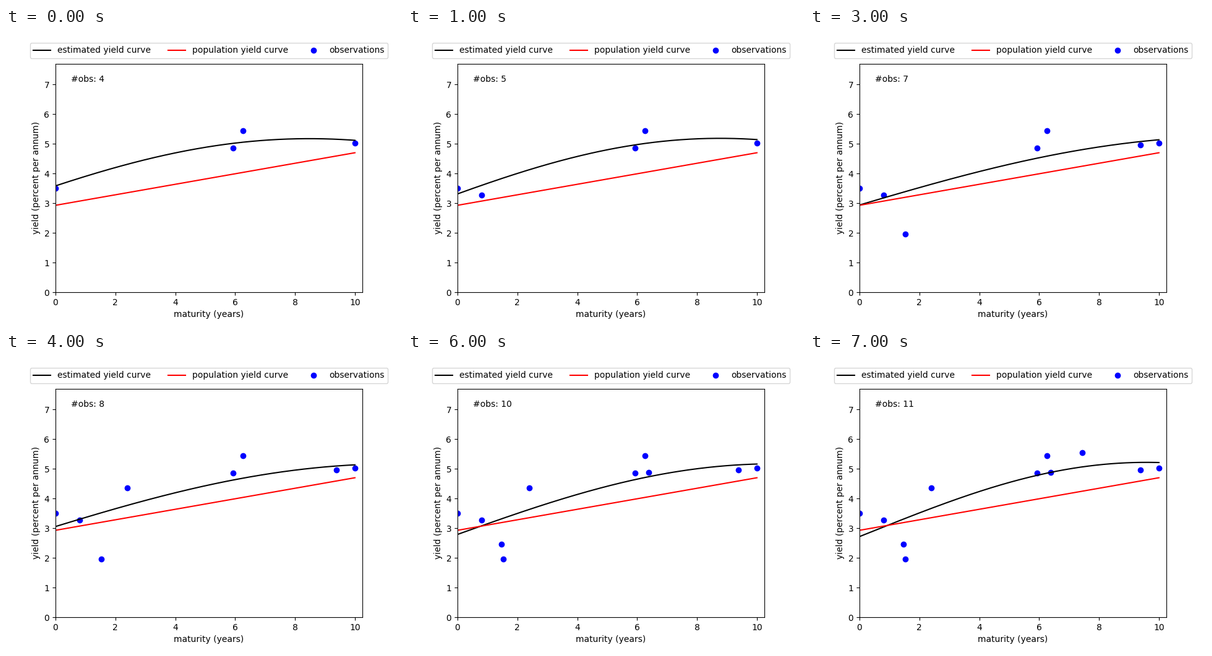
These frames come from a looping animation (640x480 px, 8 s). A matplotlib script:

```python
import numpy as np
import matplotlib.pyplot as plt
from matplotlib.animation import FuncAnimation

# Observations (maturity, yield) in the order they arrive
OBS = np.array([
    (0, 3.50), (5.93, 4.855), (6.26, 5.435), (10, 5.02),
    (0.81, 3.27), (1.53, 1.96), (9.38, 4.96), (2.40, 4.36),
    (1.47, 2.46), (6.39, 4.875), (7.44, 5.545),
])
FIRST = 4
LENGTHS = np.linspace(10, 20, 41)
NOISES = np.geomspace(1e-3, 0.3, 121)

maturity = np.linspace(0, 10, 201)


def kernel(a, b, length):
    return np.exp(-np.subtract.outer(a, b) ** 2 / (2 * length ** 2))


def estimate(x, y):
    """Gaussian process mean with maximum-likelihood length and noise."""
    best = np.inf
    for length in LENGTHS:
        values, vectors = np.linalg.eigh(kernel(x, x, length))
        spread = values + NOISES[:, None]
        scale = ((vectors.T @ y) ** 2 / spread).mean(axis=1)
        score = len(x) * np.log(scale) + np.log(spread).sum(axis=1)
        i = score.argmin()
        if score[i] < best:
            best = score[i]
            weights = vectors @ (vectors.T @ y / spread[i])
            mean = kernel(maturity, x, length) @ weights
    return mean


fits = [estimate(*OBS[:n].T) for n in range(FIRST, len(OBS) + 1)]

fig, ax = plt.subplots(figsize=(6.4, 4.8), dpi=100)
curve, = ax.plot([], [], color="black", label="estimated yield curve")
ax.plot([0, 10], [2.93, 4.70], color="red", label="population yield curve")
dots = ax.scatter([], [], color="blue", label="observations")
counter = ax.text(0.05, 0.92, "", transform=ax.transAxes)

ax.set_xlim(0, 10.25)
ax.set_ylim(0, 7 * 1.1)
ax.set_xlabel("maturity (years)")
ax.set_ylabel("yield (percent per annum)")
ax.legend(loc="upper center", bbox_to_anchor=(0.5, 1.11), ncol=3,
          scatteryoffsets=[0.5])


def update(step):
    count = FIRST + step
    curve.set_data(maturity, fits[step])
    dots.set_offsets(OBS[:count])
    counter.set_text(f"#obs: {count}")
    return curve, dots, counter


anim = FuncAnimation(fig, update, frames=len(fits), interval=1000, repeat=True)
plt.show()
```
